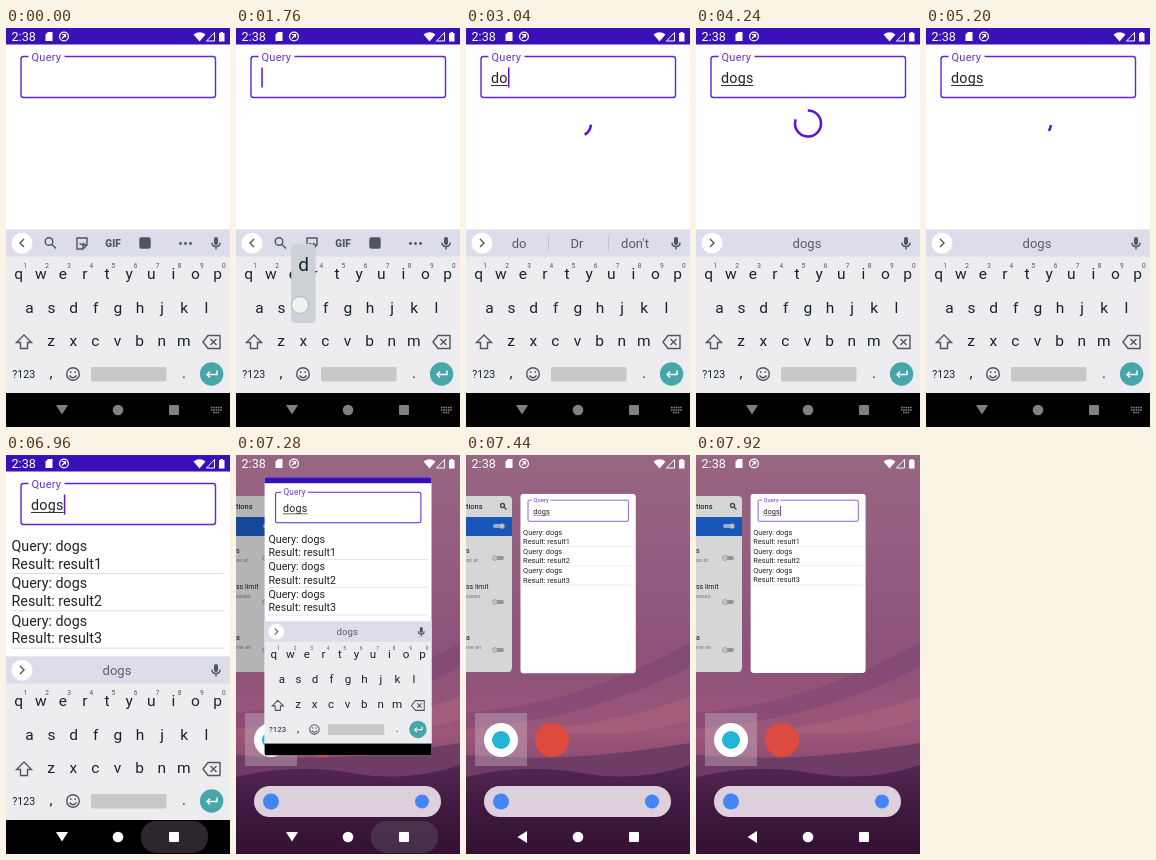
An HTML page that plays this animation: 224 px wide and 399 px high, repeating every 8000 ms.

```html
<!DOCTYPE html>
<html lang="en">
<head>
<meta charset="utf-8">
<title>Search with delay</title>
<style>
html, body { margin: 0; width: 100%; height: 100%; overflow: hidden; background: #000; }
svg { display: block; width: 224px; height: 399px; font-family: Roboto, sans-serif; }
.mid { text-anchor: middle; }
.line { fill: none; stroke: #50565c; stroke-width: 1.4; }
.ink { fill: #17222c; }
</style>
</head>
<body>
<svg viewBox="0 0 224 399">
  <defs>
    <linearGradient id="sky" x2="0" y2="1">
      <stop offset="0" stop-color="#976680"/>
      <stop offset=".25" stop-color="#935d80"/>
      <stop offset=".5" stop-color="#8d517a"/>
      <stop offset=".7" stop-color="#9b5678"/>
      <stop offset=".78" stop-color="#8a4a70"/>
    </linearGradient>
    <linearGradient id="land" x2="0" y2="1">
      <stop offset="0" stop-color="#532850"/>
      <stop offset=".5" stop-color="#3f193f"/>
      <stop offset="1" stop-color="#331034"/>
    </linearGradient>
    <clipPath id="window"><rect id="frame"/></clipPath>
  </defs>

  <g id="home">
    <rect width="224" height="399" fill="url(#sky)"/>
    <path d="M0 258q110-8 224-70v24q-100 52-224 62z" fill="#773f70" opacity=".4"/>
    <path d="M70 276q80-8 154-34v22q-60 22-154 12z" fill="#b0667c" opacity=".5"/>
    <path d="M0 300q50 4 100 2t124-14v111H0z" fill="#6f3c66"/>
    <path d="M0 322q60-14 115-4t109-8v89H0z" fill="url(#land)"/>
    <g id="settings">
      <path d="M0 41h42q4 0 4 4v167q0 5-4 5H0z" fill="#f5f3f5"/>
      <rect y="62" width="46" height="19" fill="#1d62d2"/>
      <g class="line" stroke-width="1"><circle cx="36.5" cy="50.5" r="2"/><path d="M38 52l2.5 2.5"/></g>
    </g>
    <path id="shade" d="M0 41h42q4 0 4 4v167q0 5-4 5H0z"/>
    <rect x="9" y="258" width="52" height="53" fill="#d6c6d2" opacity=".36"/>
    <circle cx="35" cy="285" r="17" fill="#fff"/>
    <circle cx="35" cy="285" r="9" fill="#22b6d4"/>
    <circle cx="86" cy="285" r="17" fill="#dd4b3e"/>
    <rect x="18" y="331" width="187" height="31" rx="15.5" fill="#ddd0dc"/>
    <circle cx="35" cy="346.5" r="8" fill="#4285f4"/>
    <circle cx="186" cy="346.5" r="7" fill="#4285f4"/>
  </g>

  <g id="app" clip-path="url(#window)">
    <rect width="224" height="399" fill="#fff"/>
    <rect width="224" height="16.5" fill="#3a10b8"/>
    <g id="results"></g>
    <rect x="15" y="28.5" width="194.5" height="41" rx="2.5" fill="#fff" stroke="#6026d2" stroke-width="1.4"/>
    <rect x="22.5" y="25" width="36" height="7" fill="#fff"/>
    <text x="25.5" y="32.7" font-size="11" letter-spacing=".25" fill="#6a32d0">Query</text>
    <text id="query" x="25" y="54.6" font-size="14.3" letter-spacing=".22" fill="#222"></text>
    <rect id="underline" x="25" y="57" height="1" fill="#333"/>
    <rect id="cursor" y="39.5" width="1.5" height="20" fill="#5b16d0"/>
    <circle id="spinner" cx="112" cy="95.5" r="13" fill="none" stroke="#5b0fe0" stroke-width="2.5" pathLength="360"/>

    <g id="keyboard">
      <rect y="201.5" width="224" height="164" fill="#ededef"/>
      <rect y="201.5" width="224" height="27" fill="#dddcea"/>
      <circle cx="16" cy="215.2" r="10.5" fill="#fff"/>
      <path id="chevron" class="line" d="M18 211l-4 4 4 4"/>
      <g id="tools" class="line">
        <circle cx="43" cy="213.5" r="3.8"/><path d="M46 216.5l4 4"/>
        <path d="M71 210h10v7l-4 4h-6zM81 217h-4v4M73.5 215q2.5 3 5 0"/>
        <rect x="134" y="210" width="10" height="10" rx="1.5" fill="#50565c"/>
        <g fill="#50565c" stroke="none">
          <text class="mid" x="107" y="219" font-size="10" font-weight="900">GIF</text>
          <circle cx="174.5" cy="215.5" r="1.4"/><circle cx="179.5" cy="215.5" r="1.4"/><circle cx="184.5" cy="215.5" r="1.4"/>
        </g>
      </g>
      <g id="hints" class="mid" font-size="13" fill="#5a5c62"></g>
      <rect x="208" y="209" width="4" height="8" rx="2" fill="#50565c"/>
      <path class="line" d="M206 214.5q0 4 4 4t4-4M210 218.5v3"/>
      <g id="keys" class="mid ink"></g>
      <path class="line" d="M18 307l7.5 7.5h-4v6h-7v-6h-4z"/>
      <path class="line" d="M197 314l5-6.500h12v13h-12zM204.5 311l6 6m0-6l-6 6"/>
      <circle class="line" cx="67" cy="346" r="6.3"/>
      <path class="line" d="M63.5 347.5q3.5 4.5 7 0M64.8 343.2v1.8M69.2 343.2v1.8"/>
      <rect x="85" y="339" width="75.5" height="14.5" rx="1.5" fill="#c8c8ca"/>
      <circle cx="205.6" cy="346" r="11.7" fill="#47a6aa"/>
      <path d="M211 342.5v4h-10m3-3l-3 3 3 3" fill="none" stroke="#fff" stroke-width="1.4"/>
      <g id="popup">
        <rect x="55.5" y="217" width="24" height="78" rx="4" fill="#a9aeb2" opacity=".5"/>
        <rect x="55.5" y="216" width="23.5" height="78" rx="4" fill="#cdd2d6"/>
        <text class="mid ink" x="67.5" y="243" font-size="19">d</text>
      </g>
    </g>
    <rect y="365" width="224" height="34" fill="#000"/>
  </g>

  <g fill="#fff">
    <text x="5.5" y="13" font-size="12.6">2:38</text>
    <path d="M42 4h4.5v9H39.5V6.500z"/>
    <g fill="none" stroke="#fff" stroke-width="1.2"><circle cx="58" cy="8.5" r="4.4"/><path d="M56 6.5h3.5v3M56 10.5l3.5-4"/></g>
    <path d="M187.5 6.5q6-4.5 12 0l-6 7zM213 5h1.5V4h2.5v1h1.5v8.5H213z"/>
    <path d="M208.5 4.500v8.500h-8z" fill="none" stroke="#fff"/>
  </g>
  <rect id="ripple" x="135" y="366" width="67" height="32" rx="15" fill="#5c4c5c" opacity=".5"/>
  <g id="nav">
    <path id="back" d="M50 377h12l-6 9.500z"/>
    <circle cx="112" cy="382" r="5.3"/>
    <rect x="163" y="377" width="10" height="10" rx="1"/>
    <path id="imeIcon" d="M205 379.5h11M205 382h11M207 384.5h7" stroke="#8a8a8a" stroke-width="1.5" stroke-dasharray="1.5 .8"/>
  </g>
  <circle id="touch" r="8.5" fill="#f3f3f3" fill-opacity=".92" stroke="#aaa" stroke-width=".8"/>
</svg>
<script>
const $ = id => document.getElementById(id);
const set = (id, attrs) => { for (const k in attrs) $(id).setAttribute(k, attrs[k]); };
const show = (id, on) => set(id, { visibility: on ? 'visible' : 'hidden' });
const clamp = x => Math.max(0, Math.min(1, x));
const text = (s, x, y, size, extra = '') => `<text x="${x}" y="${y}" font-size="${size}" ${extra}>${s}</text>`;

const LOOP = 8000, STEP = 80, KEY = 22.1;
const BLINKS = [240, 720, 1280, 3920, 4480, 4960, 5440, 6000, 6640, 7120, 7600];
const TYPED = [[1920, 'd'], [2880, 'do'], [3200, 'dog'], [3440, 'dogs']];

// Static parts built from rules
$('keys').innerHTML =
  [['qwertyuiop', 12.7, 251], ['asdfghjkl', 23.5, 284.5], ['zxcvbnm', 45.2, 318]].map(([row, x, y]) =>
    [...row].map((c, i) => text(c, x + i * KEY, y, 15.5)).join('')).join('') +
  [...'1234567890'].map((c, i) => text(c, 19 + i * KEY, 240, 6.5, 'fill="#555"')).join('') +
  text('?123', 17.8, 350, 10.6) + text(',', 45, 350, 15) + text('.', 178, 350, 15);

$('results').innerHTML = [1, 2, 3].map(n => {
  const y = 118.5 + (n - 1) * 37.3;
  return text('Query: dogs', 5.5, y - 22.5, 14.3, 'fill="#222"') +
    text('Result: result' + n, 5.5, y - 5, 14.3, 'fill="#222"') +
    `<path d="M5.5 ${y}H219" stroke="#dcdcdc"/>`;
}).join('');

$('settings').innerHTML +=
  text('tions', 0, 54, 7.5) +
  [[98, 's', 'as at'], [134, 'ss limit', 'eases'], [185, 'a', 'me an']].map(([y, title, note]) =>
    text(title, 0, y, 7, 'fill="#222"') + text(note, 0, y + 9, 5.5, 'fill="#888"')).join('') +
  [[71, 36, '#a8c8ff'], [103, 29, '#aaa'], [147, 29, '#aaa'], [195, 29, '#aaa']].map(([y, x, c]) =>
    `<rect x="27" y="${y - 2}" width="11" height="4" rx="2" fill="${c}"/>` +
    `<circle cx="${x}" cy="${y}" r="2.6" fill="#ddd" stroke="#999" stroke-width=".5"/>`).join('');

// Standard cubic-bezier(.4, 0, .2, 1)
function ease(x) {
  let lo = 0, hi = 1;
  for (let i = 0; i < 20; i++) {
    const u = (lo + hi) / 2, v = 1 - u;
    if (1.2 * v * v * u + .6 * v * u * u + u ** 3 < x) lo = u; else hi = u;
  }
  return lo * lo * (3 - 2 * lo);
}

function drawSpinner(t) {
  const elapsed = 1020 + .815 * (t - 3040);
  const on = elapsed > 0 && t < 5840;
  show('spinner', on);
  if (!on) return;
  const turn = Math.floor(elapsed / 1332), local = elapsed % 1332;
  const head = 290 * ease(clamp(local / 666));
  const tail = 290 * ease(clamp(local / 666 - 1));
  const angle = tail - 90 + turn * 216 + 286 * local / 1332;
  const sweep = Math.max(2, head - tail);
  set('spinner', {
    'stroke-dasharray': `${sweep} ${360 - sweep}`,
    transform: `rotate(${angle} 112 95.5)`,
    opacity: 1 - clamp((t - 5600) / 240)
  });
}

function drawField(t) {
  const word = TYPED.reduce((w, [at, s]) => t >= at ? s : w, '');
  if ($('query').textContent !== word) $('query').textContent = word;
  const width = word ? $('query').getComputedTextLength() : 0;
  set('underline', { width });
  set('cursor', { x: 25.3 + width });
  show('cursor', BLINKS.filter(b => b <= t).length % 2);
}

let hintKey;
function drawKeyboard(t) {
  const typed = t >= 1920, visible = t < 7440;
  const key = !typed ? '' : t < 3440 ? 'do,Dr,don\'t' : 'dogs';
  if (key !== hintKey) {
    hintKey = key;
    const words = key.split(','), many = words.length > 1;
    $('hints').innerHTML = words.map((w, i) => text(w, many ? 53 + 58 * i : 111, 220, 13)).join('') +
      (many ? '<path d="M82.5 208v15M142.5 208v15" stroke="#c3c3d0"/>' : '');
  }
  set('chevron', { transform: typed ? 'rotate(180 16 215)' : '' });
  show('tools', visible && !typed);
  show('popup', t >= 1760 && t < 1920);
  show('keyboard', visible);
}

function drawWindow(t) {
  const x = clamp((t - 7100) / 350), p = x * x * (3 - 2 * x), scale = 1 - .485 * p;
  set('app', { transform: `translate(${54.4 * p} ${30.5 * p}) scale(${scale})` });
  set('frame', { width: 224, y: 16 * p, height: 399 - 51 * p, rx: 7 * p });
  set('shade', { opacity: .42 - .3 * p });
  show('home', p > 0);

  const press = t >= 6960;
  set('nav', { fill: press ? '#fff' : '#808080' });
  set('back', { transform: t >= 7440 ? 'rotate(90 56 382)' : '' });
  show('imeIcon', !press);
  show('ripple', press && t < 7440);

  const onKey = t >= 1600 && t < 1920, onNav = t >= 6800 && t < 6960;
  show('touch', onKey || onNav);
  set('touch', { cx: onNav ? 173 : 64, cy: onNav ? 389 : 277 });
}

function draw(now) {
  const t = Math.floor(now % LOOP / STEP) * STEP;
  drawField(t);
  drawSpinner(t);
  drawKeyboard(t);
  show('results', t >= 5680);
  set('results', {
    transform: `translate(0 ${43 * (1 - clamp((t - 5640) / 440))})`,
    opacity: clamp((t - 5600) / 240)
  });
  drawWindow(t);
  requestAnimationFrame(draw);
}
draw(performance.now());
</script>
</body>
</html>
```
